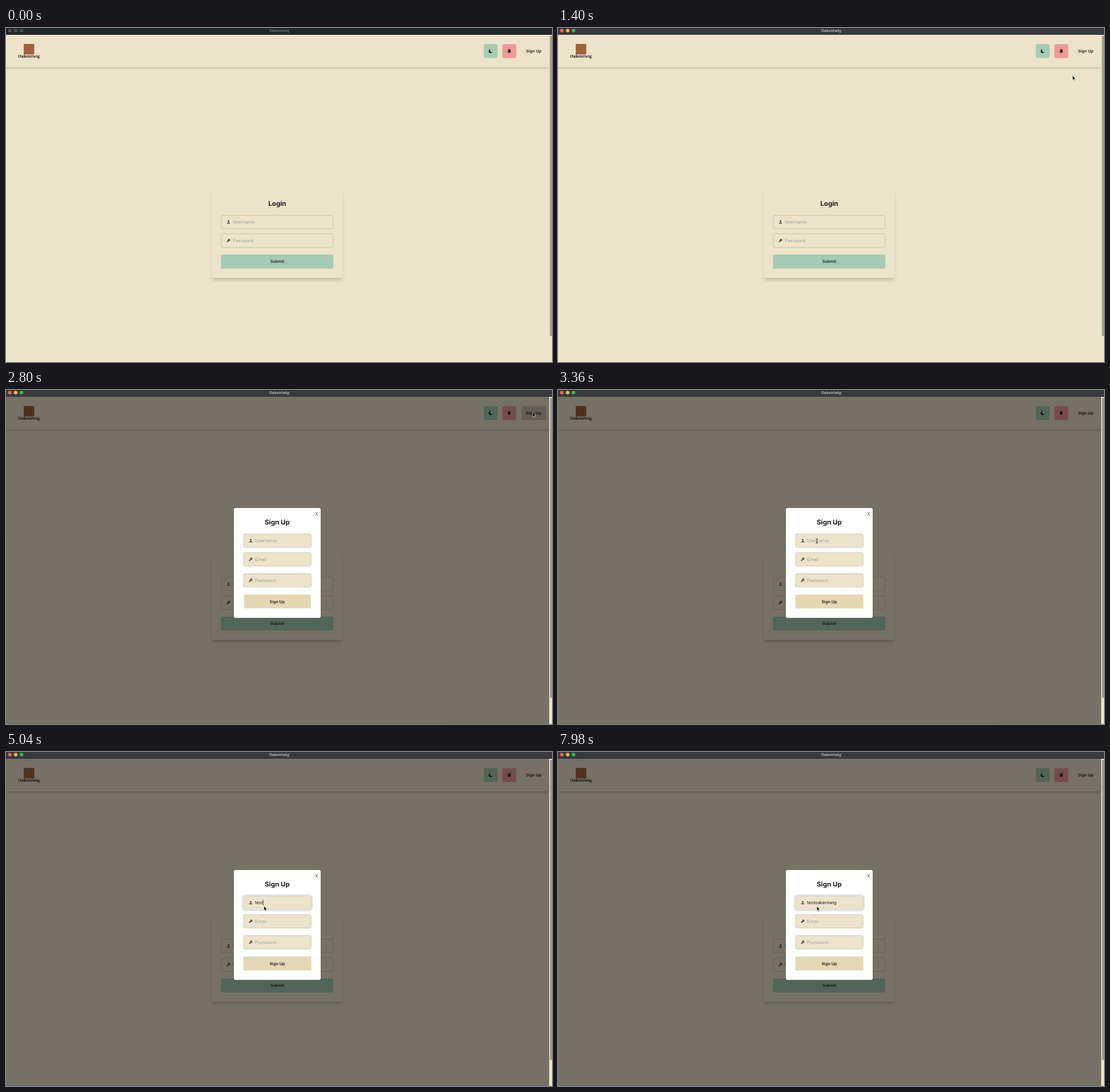
Recreate the animation shown at these times as an HTML page. Size 956 by 586 pixels, loop 8 s.

```html
<!DOCTYPE html>
<html lang="en">
<head>
<meta charset="utf-8">
<title>Oakentwig</title>
<style>
  html, body { margin: 0; width: 100%; height: 100%; overflow: hidden; background: #ece3ca; }
  svg { display: block; width: 956px; height: 586px; }
  text { font: 400 7.83px Inter, sans-serif; fill: #282425; text-rendering: geometricPrecision; white-space: pre; }
  .mid { text-anchor: middle; }
  .label { font-size: 7.2px; font-weight: 600; fill: #1f1c1d; }
  .title { font-size: 11.6px; font-weight: 700; fill: #1f1c1d; }
  .hint { fill: #9ca0a5; }
  .brand { font: 900 7px "Noto Serif", serif; fill: #1d1816; }
  .bar { font-size: 6.7px; font-weight: 700; }
  .field { fill: #ece3ca; stroke: #282425; stroke-opacity: .22; stroke-width: .8; }
  .icon { fill: #282425; fill-opacity: .75; }
  .blur { filter: blur(1.8px); }
  .soft { filter: blur(3.4px); }
</style>
</head>
<body>
<svg id="stage" viewBox="0 0 956 586">
  <defs>
    <path id="user" d="M8 8a3 3 0 1 0 0-6 3 3 0 0 0 0 6ZM12.7 14c.6 0 1.1-.6.9-1.1a6 6 0 0 0-11.2 0c-.2.5.3 1.1.9 1.1Z"/>
    <path id="key" fill-rule="evenodd" d="M14 6a4 4 0 0 1-4.9 3.9L7 12H5v2H2V11L6.1 6.9A4 4 0 1 1 14 6Zm-4-2v1.5l.5.5H12a2 2 0 0 0-2-2Z"/>
  </defs>

  <rect width="956" height="586" fill="#ece3ca"/>

  <g id="page">
    <rect class="blur" x="0" y="50" width="950" height="20.5" fill-opacity=".2"/>
    <rect y="12" width="951" height="57" fill="#ece3ca"/>
    <rect y="12" width="951" height="1" fill="#fff" fill-opacity=".3"/>
    <rect x="31" y="28" width="18.5" height="18.5" fill="#a2633c"/>
    <text class="brand mid" x="40.3" y="51.6">Oakentwig</text>

    <rect x="836.5" y="28.3" width="24.4" height="24.5" rx="3.2" fill="#a4cbb4"/>
    <path transform="translate(848.6 40.5)" d="M3.3 1.3A3.6 3.6 0 1 1-.6-3.6 3.2 3.2 0 0 0 3.3 1.3Z" fill="#1f1c1d"/>
    <rect x="869" y="28.3" width="24.4" height="24.5" rx="3.2" fill="#ef9995"/>
    <path transform="translate(881.2 40.5)" d="M0-3.6C1.7-3.4 2.2-2.2 2.2-.8 2.2.6 2.6 1.2 3.2 1.9V2.3H-3.2V1.9C-2.6 1.2-2.2.6-2.2-.8-2.2-2.2-1.7-3.4 0-3.6ZM-1 2.8H1A1 .9 0 0 1-1 2.8Z" fill="#282425"/>
    <rect id="hover" x="902.2" y="28.3" width="43.6" height="24.5" rx="3.2" fill="#282425" fill-opacity=".2"/>
    <text class="label mid" x="924" y="43.2">Sign Up</text>

    <rect class="soft" x="361.5" y="291" width="227" height="152" rx="3" fill-opacity=".13"/>
    <rect class="blur" x="362" y="288" width="226" height="152" rx="3" fill-opacity=".11"/>
    <rect x="360.2" y="284" width="229.4" height="154.5" rx="3.5" fill="#ece3ca"/>
    <text class="title mid" x="474.9" y="312">Login</text>
    <g id="loginFields"></g>
    <rect x="376.5" y="397.6" width="196.8" height="24.5" rx="2.2" fill="#a4cbb4"/>
    <text class="label mid" x="474.9" y="412.4">Submit</text>
  </g>

  <rect x="952.4" y="13.5" width="3.6" height="527" rx="1.5" fill="#a09a8e"/>

  <g id="modal">
    <rect y="12" width="951" height="574" fill-opacity=".5"/>
    <rect x="399" y="207" width="152" height="192.8" rx="3.4" fill="#fff"/>
    <text class="mid" x="544" y="220.2" fill-opacity=".85">X</text>
    <text class="title mid" x="474.9" y="236">Sign Up</text>
    <rect id="focus" x="414" y="250.7" width="122" height="27.6" rx="4.4" fill="none" stroke="#282425" stroke-opacity=".25"/>
    <g id="signupFields"></g>
    <g id="submit">
      <rect x="415.5" y="358.7" width="119.2" height="24.5" rx="2.2" fill="#e4d8b4"/>
      <text class="label mid" x="474.9" y="373.6">Sign Up</text>
    </g>
    <text id="typed" x="436" y="267.3"></text>
    <rect id="caret" y="259.3" width=".8" height="9.8" fill="#282425"/>
  </g>

  <rect id="bar" width="956" height="12"/>
  <g id="dots"></g>
  <text id="barText" class="bar mid" x="478.3" y="6.9">Oakentwig</text>

  <g id="ring">
    <circle cx="922" cy="40.6" r="14.6" fill="#808080" fill-opacity=".25" stroke="#fff" stroke-opacity=".6" stroke-width="2.8"/>
    <circle cx="922" cy="40.6" r="14.6" fill="none" stroke="#0c0c0c" stroke-width="1.7"/>
  </g>
  <g id="cursor">
    <path id="arrow" d="M0 0V7.6L1.7 6.1 2.9 8.8 4.2 8.2 3.1 5.6H5.4Z" fill="#000" stroke="#fff" stroke-width=".55"/>
    <path id="hand" d="M-.7 0Q0-.8.7 0V3L3.4 3.5Q4.6 3.8 4.4 5.2L3.6 8.3H-.3L-2.5 5.2Q-2.8 4.3-1.9 4.3L-.7 5.2Z" fill="#fff" stroke="#111" stroke-width=".8"/>
    <g id="beam" fill="none" stroke-linecap="round">
      <path d="M-1.6-4Q0-4 0-3 0-4 1.6-4M0-3V3M-1.6 4Q0 4 0 3 0 4 1.6 4M-.9 1.4H.9" stroke="#fff" stroke-width="1.6" stroke-opacity=".6"/>
      <path d="M-1.6-4Q0-4 0-3 0-4 1.6-4M0-3V3M-1.6 4Q0 4 0 3 0 4 1.6 4M-.9 1.4H.9" stroke="#111" stroke-width=".8"/>
    </g>
  </g>
</svg>

<script>
const LOOP = 8000, STEP = 70, USERNAME = 'testoakentwig';
const $ = id => document.getElementById(id);
const show = (id, on) => $(id).setAttribute('visibility', on ? 'inherit' : 'hidden');
const within = (t, spans) => spans.some(([from, to]) => t >= from && t < to);

const field = (x, y, width, icon, hint) => `
  <rect class="field" x="${x + .4}" y="${y + .4}" width="${width - .8}" height="23.7" rx="3"/>
  <use class="icon" href="#${icon}" transform="translate(${x + 9} ${y + 8.1}) scale(.51)"/>
  <text class="hint" x="${x + 20.7}" y="${y + 15.2}">${hint}</text>`;

$('loginFields').innerHTML =
  field(376.5, 328, 196.8, 'user', 'Username') + field(376.5, 360.7, 196.8, 'key', 'Password');
$('signupFields').innerHTML =
  field(415.4, 252.1, 119.4, 'user', 'Username') +
  field(415.4, 284.8, 119.4, 'key', 'Email') +
  field(415.4, 321.7, 119.4, 'key', 'Password');
$('dots').innerHTML = [6.6, 16.9, 27.2].map(x => `<circle cx="${x}" cy="4.6" r="3.15"/>`).join('');

const usernameHint = $('signupFields').querySelector('.hint');
const dots = [...$('dots').children];
const LIGHTS = ['#ff5f57', '#febc2e', '#28c840'];

// Pointer path: time, x, y
const PATH = [
  [70, 566, 514], [210, 640, 415], [350, 735, 285], [490, 822, 170], [630, 878, 95], [770, 910, 54],
  [840, 917.5, 46], [910, 917.5, 44], [1050, 917.5, 44], [1190, 909, 64], [1330, 901, 82],
  [1400, 901, 83.7], [1470, 901, 86], [1610, 908, 66], [1750, 919, 44], [1820, 922, 39.5],
  [2800, 922, 39.5], [2870, 912, 48], [3010, 785, 128], [3150, 590, 222], [3290, 468, 261],
  [3430, 438.5, 268.8], [3500, 438.5, 269.6], [3640, 438.5, 269.6], [3920, 452, 270],
  [4270, 452, 270], [5040, 451.7, 270.4], [7910, 451.7, 270.4], [7980, 453.2, 270.7]
];
const KEY_TIMES = [4270, 4480, 4620, 4760, 6160, 6300, 6370, 6440, 6650, 6790, 7000, 7140, 7210];
const CARET = [[3640, 4130], [4270, 5320], [5810, 7770]];
const POINTER = [[70, 4270], [5040, 6160], [7980, LOOP]];
const POP = [[2800, .983], [2870, 1.01], [2940, 1.008], [3010, 1]];

function pointerAt(t) {
  const next = PATH.findIndex(p => p[0] > t);
  if (next < 1) return next ? PATH.at(-1).slice(1) : PATH[0].slice(1);
  const [t0, x0, y0] = PATH[next - 1], [t1, x1, y1] = PATH[next];
  const k = (t - t0) / (t1 - t0);
  return [x0 + (x1 - x0) * k, y0 + (y1 - y0) * k];
}

function draw(time) {
  const t = Math.floor(time / STEP) * STEP;

  const active = t >= 1330;
  $('bar').setAttribute('fill', active ? '#37393c' : '#23272a');
  $('barText').style.fill = active ? '#b2b4b6' : '#6d7275';
  dots.forEach((dot, i) => dot.setAttribute('fill', active ? LIGHTS[i] : '#4b4f51'));

  const pressed = within(t, [[2660, 2800]]);
  show('hover', within(t, [[1680, 2870]]));
  $('hover').setAttribute('transform', pressed ? 'translate(924 40.5) scale(.97) translate(-924 -40.5)' : '');
  show('ring', pressed);

  show('modal', t >= 2800);
  show('focus', t >= 3640);
  const scale = POP.findLast(p => t >= p[0])?.[1] ?? 1;
  $('submit').setAttribute('transform', `translate(474.9 371) scale(${scale}) translate(-474.9 -371)`);

  const count = KEY_TIMES.filter(k => t >= k).length;
  $('typed').textContent = USERNAME.slice(0, count);
  usernameHint.setAttribute('visibility', count ? 'hidden' : 'inherit');
  $('caret').setAttribute('x', 436.1 + (count ? $('typed').getComputedTextLength() : 0));
  show('caret', within(t, CARET));

  const [x, y] = pointerAt(t);
  const shape = within(t, [[1680, 2800]]) ? 'hand' : within(t, [[3360, 4270]]) ? 'beam' : 'arrow';
  for (const id of ['arrow', 'hand', 'beam']) show(id, id === shape);
  $('cursor').setAttribute('transform', `translate(${x} ${y})`);
  show('cursor', within(t, POINTER));
}

const start = performance.now();
function tick() {
  draw((performance.now() - start) % LOOP);
  requestAnimationFrame(tick);
}
tick();
</script>
</body>
</html>
```
